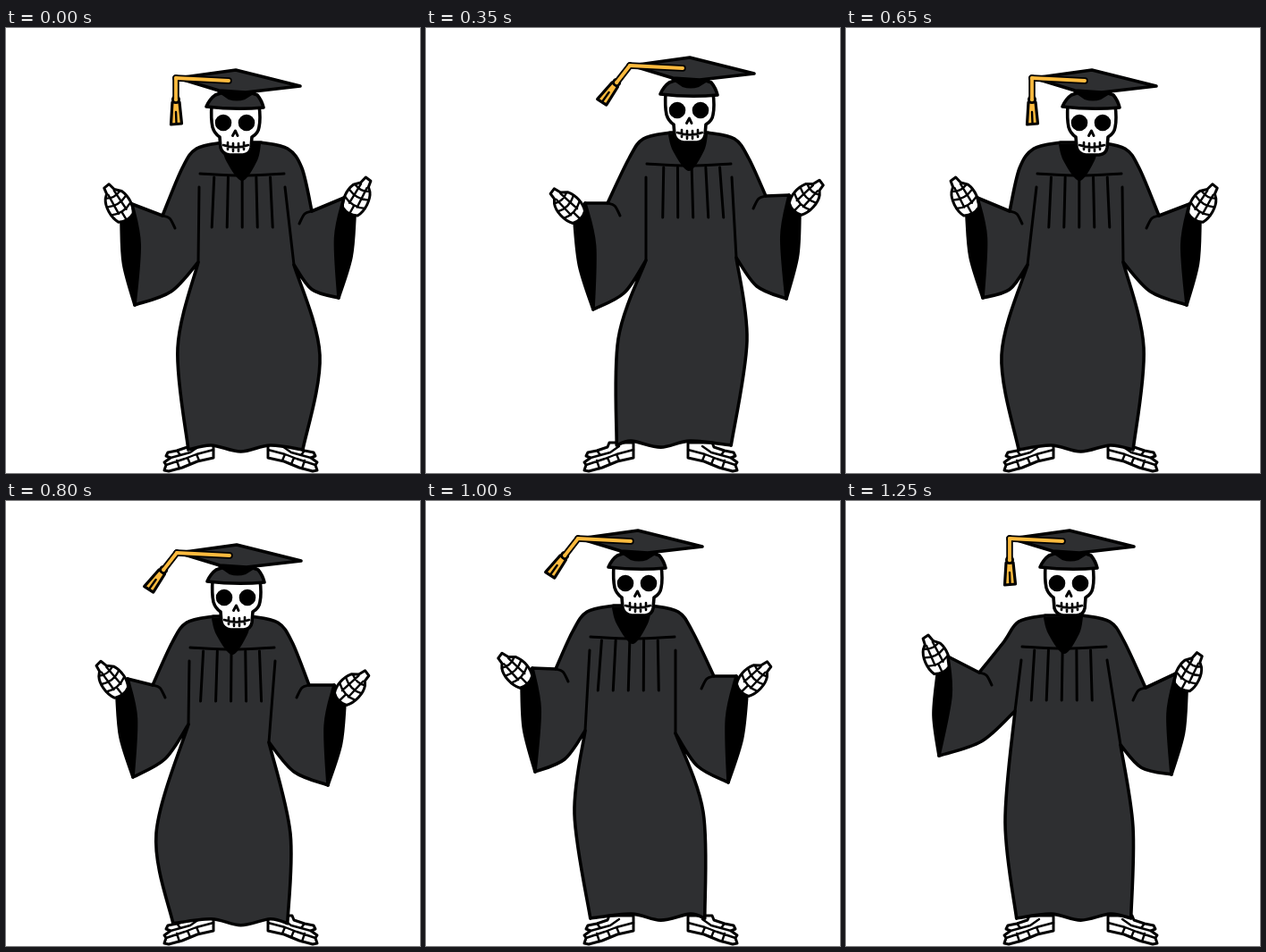
Write an HTML page with a canvas that moves like this. It is 463 px wide and 498 px high and loops after 1.3 s.

```html
<!DOCTYPE html>
<html lang="en">
<head>
<meta charset="utf-8">
<title>Graduate dance</title>
<style>
html, body { margin: 0; width: 100%; height: 100%; overflow: hidden; background: #fff; }
canvas { display: block; width: 463px; height: 498px; }
</style>
</head>
<body>
<canvas id="stage"></canvas>
<script>
const W = 463, H = 498, LOOP = 1300, HALF = LOOP / 2, STEP = 50, AXIS = 262.5;
const GOWN = '#2e2f31', GOLD = '#fcba3e';
const canvas = document.getElementById('stage');
const ctx = canvas.getContext('2d');
const dpr = window.devicePixelRatio || 1;
canvas.width = W * dpr;
canvas.height = H * dpr;

const pairs = a => a.reduce((out, v, i) => (i % 2 ? out[out.length - 1].push(v) : out.push([v]), out), []);
const mix = (a, b, k) => [a[0] + (b[0] - a[0]) * k, a[1] + (b[1] - a[1]) * k];

// Key poses: head offset and chest, then per arm: elbow, wrist, cuff end, armpit, hip.
// The second half of the loop is the first half seen in a mirror.
const keys = [];
const flip = a => a.map((v, i) => (i % 2 ? v : 2 * AXIS - v));
function key(t, head, chest, left, right) {
  const add = (time, ...parts) => keys.push({ t: time % LOOP, v: parts.flat() });
  add(t, head, chest, left, right);
  add(t + HALF, [18 - head[0], head[1]], flip(chest), flip(right), flip(left));
}
key(0, [0, 0], [264, 164],
  [175, 210, 135, 213, 144, 310, 215, 262, 192, 358], [342, 205, 384, 206, 372, 302, 322, 265, 351, 366]);
key(150, [17, 2], [272, 165],
  [186, 206, 152, 222, 165, 318, 231, 270, 207, 372], [361, 206, 395, 215, 383, 309, 321, 250, 357, 372]);
key(350, [38, -14], [294, 153],
  [203, 196, 172, 212, 187, 315, 246, 260, 215, 348], [380, 188, 412, 203, 403, 303, 347, 257, 359, 350]);
key(550, [47, -24], [306, 150],
  [213, 184, 180, 203, 186, 286, 240, 258, 217, 350], [392, 173, 428, 190, 424, 280, 352, 222, 349, 340]);
key(1250, [-7, -14], [244, 164],
  [149, 192, 108, 190, 104, 285, 189, 235, 178, 360], [335, 209, 375, 209, 364, 306, 307, 273, 321, 365]);
keys.sort((a, b) => a.t - b.t);

const keyAt = i => {
  const n = keys.length, k = keys[(i + n) % n];
  return { t: k.t + Math.floor(i / n) * LOOP, v: k.v };
};

// Hermite curve; horizontal moves stop at their turning points, vertical ones swing past
function poseAt(t) {
  let i = keys.length - 1;
  while (keys[i].t > t) i--;
  const [a, b, c, d] = [-1, 0, 1, 2].map(k => keyAt(i + k));
  const h = c.t - b.t, u = (t - b.t) / h, ease = u * u * (3 - 2 * u);
  const slope = (p, q, r, j) => {
    const h0 = q.t - p.t, h1 = r.t - q.t;
    const d0 = (q.v[j] - p.v[j]) / h0, d1 = (r.v[j] - q.v[j]) / h1;
    if (j % 2 === 0) return d0 * d1 > 0 ? 2 * d0 * d1 / (d0 + d1) : 0;
    return (d0 * h1 + d1 * h0) / (h0 + h1);
  };
  const pts = pairs(b.v.map((v, j) => v + (c.v[j] - v) * ease +
    h * u * (1 - u) * ((1 - u) * slope(a, b, c, j) - u * slope(b, c, d, j))));
  const [head, chest] = pts, left = pts.slice(2, 7), right = pts.slice(7);
  const hem = [mix([AXIS, 0], mix(left[4], right[4], .5), .6)[0], 472 + head[1] * .35];
  return {
    head, chest, hem,
    left: buildSide(left, chest, hem, -1),
    right: buildSide(right, chest, hem, 1),
    tassel: .82 * Math.max(0, Math.sin(Math.PI * (t % HALF) / 500))
  };
}

// Works out one half of the gown; dir points away from the body
function buildSide([elbow, wrist, cuffEnd, join, hip], chest, hem, dir) {
  const by = (p, out, down) => [p[0] + dir * out, p[1] + down];
  const cuff = by(wrist, -6, -16), rim = by(wrist, 6, 5);
  return {
    dir, wrist,
    angle: dir * (28 + 1.1 * (wrist[1] - elbow[1])) * Math.PI / 180,
    rim: [rim, by(mix(rim, cuffEnd, .5), 5, 0), cuffEnd],
    front: [cuffEnd, by(mix(cuff, cuffEnd, .4), -7, 0), cuff],
    seam: [by(chest, 48, 14), join],
    fold: [elbow, by(elbow, -8, 3), by(elbow, -14, 14)],
    outline: [
      [by(chest, 21, -36), by(chest, 51, -29), by(chest, 67, -7), elbow],
      [elbow, cuff],
      [cuff, by(mix(cuff, cuffEnd, .4), -7, 0), cuffEnd],
      [cuffEnd, by(mix(cuffEnd, join, .5), -5, 9), join],
      [join, hip, by(hem, 64, 0)]
    ]
  };
}

// Adds a smooth curve through the points
function curve(path, pts, start) {
  if (start) path.moveTo(...pts[0]);
  for (let i = 0; i < pts.length - 1; i++) {
    const p = pts[i - 1] || pts[i], a = pts[i], b = pts[i + 1], n = pts[i + 2] || b;
    path.bezierCurveTo(a[0] + (b[0] - p[0]) / 6, a[1] + (b[1] - p[1]) / 6,
      b[0] - (n[0] - a[0]) / 6, b[1] - (n[1] - a[1]) / 6, ...b);
  }
}

function paint(path, fill, width = 3.6, color = '#000') {
  if (fill) { ctx.fillStyle = fill; ctx.fill(path); }
  if (width) { ctx.lineWidth = width; ctx.strokeStyle = color; ctx.stroke(path); }
}
function line(pts) {
  const p = new Path2D();
  curve(p, pts, true);
  paint(p, null, 3);
}

const foot = new Path2D('M203 469L191 473L181 475L179 479L184 481L177 486L179 489L177 495L182 496L197 492L214 485L232 481V464H205Z');
const footBones = new Path2D('M184 481L206 475L216 468M179 489L200 482L213 477L232 472M192 474L195 478M191 484L194 493M203 481L206 488M213 477L216 484');
const hand = new Path2D('M-10-1C-15-10-14-24-9-31L-5-35L-4-42L3-43L5-35L11-29C15-20 14-8 9-1Q0 4-10-1Z');
const handBones = new Path2D('M-13-12Q0-6 13-13M-12-22Q0-16 12-22M-8-31Q0-26 9-30M-4-33L-5-9M4-34L5-9M-1-9V0');
const skull = new Path2D('M230 86Q229 102 231 111Q233 118 239 122L240 134Q242 141 250 142H265Q273 141 274 134L275 122Q282 118 283 111Q285 102 283 86Z');
const nose = new Path2D('M253.5 120.5L256.5 115L259 120.5');
const teeth = new Path2D('M243 131Q257 136 271 131M248 128V136M254 129V138M260 129V138M266 128V136');
const band = new Path2D('M224 88Q228 79 234 75Q258 66 281 75Q286 81 288 89Q257 92 224 88Z');
const shade = new Path2D('M236 70L249 79Q258 82 267 79L280 71Z');
const board = new Path2D('M192 56L257 47L329 65L268 72L238 70Z');
const cord = new Path2D('M249 59L190 56');
const strand = new Path2D('M0 0V22');
const brush = new Path2D('M-4 27L4 27L6.5 51L-5.5 52Z');
const slit = new Path2D('M0 38L.5 50');

function drawFeet() {
  for (const s of [1, -1]) {
    ctx.save();
    ctx.translate(AXIS, 0);
    ctx.scale(s, 1);
    ctx.translate(-AXIS, 0);
    paint(foot, '#fff', 3);
    paint(footBones, null, 2.4);
    ctx.restore();
  }
}

function drawCuff({ rim, front, wrist, angle, dir }) {
  const p = new Path2D();
  curve(p, rim, true);
  curve(p, front);
  p.closePath();
  paint(p, '#000');
  ctx.save();
  ctx.translate(...wrist);
  ctx.rotate(angle);
  ctx.scale(-dir, 1);
  paint(hand, '#fff', 3);
  paint(handBones, null, 2.4);
  ctx.restore();
}

function drawGown({ left, right, chest: [cx, cy], hem: [hx, hy] }) {
  const gown = new Path2D();
  left.outline.forEach((pts, i) => curve(gown, pts, i === 0));
  curve(gown, [[hx - 64, hy], [AXIS - 33, hy - 5], [AXIS, hy + 2], [AXIS + 33, hy - 5], [hx + 64, hy]]);
  [...right.outline].reverse().forEach(pts => curve(gown, [...pts].reverse()));
  gown.closePath();
  paint(gown, GOWN);
  for (const s of [left, right]) {
    line(s.seam);
    line(s.fold);
  }
  line([[cx - 47, cy - 1], [cx, cy + 1], [cx + 47, cy - 1]]);
  const sway = cx - AXIS;
  for (let i = -2; i <= 2; i++) {
    line([[cx + i * 15.7 + sway * .1, cy + 3], [cx + i * 17 + sway * .15, cy + 59]]);
  }
  const collar = new Path2D();
  curve(collar, [[cx - 22, cy - 33], [cx - 17, cy - 16], [cx, cy + 6], [cx + 16, cy - 16], [cx + 20, cy - 34]], true);
  collar.closePath();
  paint(collar, '#000', 2);
}

function drawHead({ head, tassel }) {
  ctx.save();
  ctx.translate(...head);
  paint(skull, '#fff');
  const eyes = new Path2D();
  for (const x of [243, 269]) { eyes.moveTo(x + 9.3, 106); eyes.arc(x, 106, 9.3, 0, 7); }
  paint(eyes, '#000', 0);
  paint(nose, null, 3);
  paint(teeth, null, 2.6);
  paint(band, GOWN);
  paint(shade, '#000', 2);
  paint(board, GOWN);
  paint(cord, null, 7.5);
  ctx.save();
  ctx.translate(190, 56);
  ctx.rotate(tassel);
  paint(strand, null, 7.5);
  paint(brush, GOLD, 3.2);
  paint(slit, null, 2.4);
  const knot = new Path2D();
  knot.arc(0, 24, 3.6, 0, 7);
  paint(knot, GOLD, 2.8);
  paint(strand, null, 3.8, GOLD);
  ctx.restore();
  paint(cord, null, 4, GOLD);
  ctx.restore();
}

function draw(t) {
  const pose = poseAt(t);
  ctx.setTransform(dpr, 0, 0, dpr, 0, 0);
  ctx.fillStyle = '#fff';
  ctx.fillRect(0, 0, W, H);
  ctx.lineJoin = ctx.lineCap = 'round';
  drawFeet();
  drawCuff(pose.left);
  drawCuff(pose.right);
  drawGown(pose);
  drawHead(pose);
}

const start = performance.now();
function tick() {
  const t = (performance.now() - start) % LOOP;
  draw(Math.floor(t / STEP) * STEP);
  requestAnimationFrame(tick);
}
tick();
</script>
</body>
</html>
```
